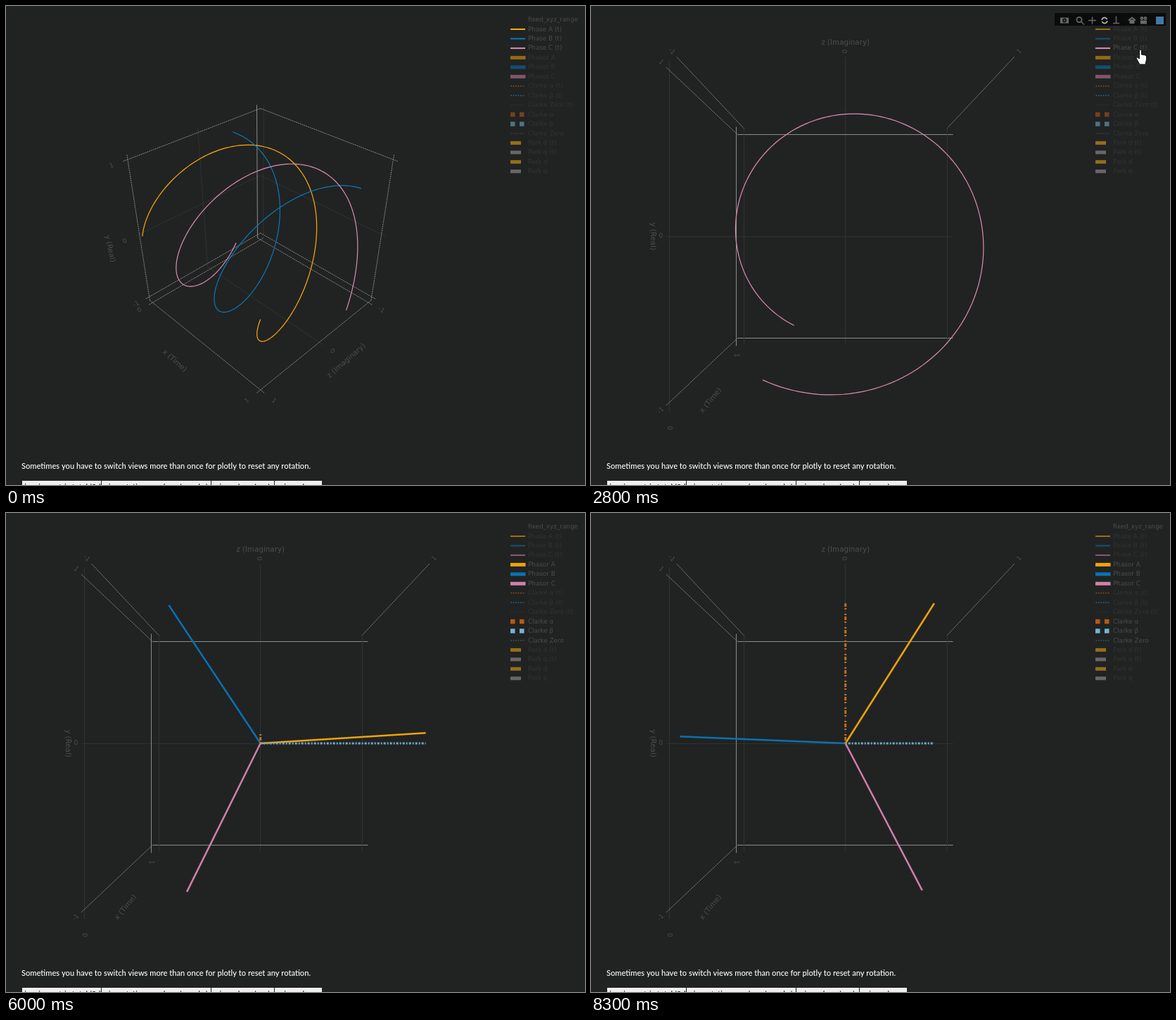
An HTML page with a canvas for the animation above (8400 ms loop, 823 by 680 pixels).

```html
<!DOCTYPE html>
<html lang="en">
<head>
<meta charset="utf-8">
<title>Phasor plot</title>
<style>
html, body { margin: 0; width: 100%; height: 100%; overflow: hidden; background: #212322; }
canvas { display: block; }
</style>
</head>
<body>
<canvas id="stage" width="823" height="680"></canvas>
<script>
const ctx = document.getElementById('stage').getContext('2d');
const LOOP = 8400, CENTER = { x: 361.7, y: 327 }, FOCAL = 770;
const BOX = 0.517, UNIT = 0.487;  // half size of the box, length of one data unit
const SANS = '"DejaVu Sans", sans-serif';
const EDGE = '#8a8b8a', GRID = '#303231', ICON = '#686a69';

// Each view: wall positions, the axis along which labels are pushed out, and a camera.
const iso = {
  walls: { x: -BOX, y: -BOX, z: -BOX }, push: { x: 'z', y: 'z', z: 'x' }, distance: 3.16,
  camera: ({ x, y, z }) => [(x - z) / Math.SQRT2, (2 * y - x - z) / Math.sqrt(6),
    3.16 - (x + y + z) / Math.sqrt(3)]
};
const front = {
  walls: { x: BOX, y: BOX, z: -BOX }, push: { x: 'y', y: 'x', z: 'x' }, distance: 2.08,
  camera: ({ x, y, z }) => [z, y, 2.08 + x]
};
const titles = { x: 'x (Time)', y: 'y (Real)', z: 'z (Imaginary)' };

const legend = [
  ['Phase A (t)', '#ffa90e', 'line'], ['Phase B (t)', '#0a78bd', 'line'],
  ['Phase C (t)', '#de8bb6', 'line'], ['Phasor A', '#f0a30a', 'bar'],
  ['Phasor B', '#0872b4', 'bar'], ['Phasor C', '#d080ac', 'bar'],
  ['Clarke α (t)', '#d5701a', 'dots'], ['Clarke β (t)', '#2a8fd6', 'dots'],
  ['Clarke Zero (t)', '#26403b', 'dots'], ['Clarke α', '#b65a16', 'squares'],
  ['Clarke β', '#72b4d4', 'squares'], ['Clarke Zero', '#2f5a50', 'dots'],
  ['Park d (t)', '#f5a919', 'short'], ['Park q (t)', '#a19da3', 'short'],
  ['Park d', '#f5a919', 'short'], ['Park q', '#a19da3', 'short']
];
const rowY = i => 33 + 13.45 * i;

// Legend rows are clicked one after another; the phases start out visible.
const clickOrder = [0, 1, 2, 3, 4, 5, 9, 10, 11];
const clickTime = n => 2500 + 260 * n;
function shown(row, t) {
  const n = clickOrder.indexOf(row);
  return n >= 0 && (t >= clickTime(n)) !== (row < 3);
}

const rotation = [[5900, 0], [6300, 3], [6600, 3], [6700, 4], [8300, 16]];

function interpolate(keys, t) {
  const next = keys.findIndex(([time]) => time > t);
  if (next < 0) return keys[keys.length - 1][1];
  if (next === 0) return keys[0][1];
  const [[t0, a], [t1, b]] = [keys[next - 1], keys[next]];
  return a + (b - a) * (t - t0) / (t1 - t0);
}

function line(points, color, width = 1, dash = []) {
  ctx.beginPath();
  points.forEach(([x, y]) => ctx.lineTo(x, y));
  ctx.strokeStyle = color;
  ctx.lineWidth = width;
  ctx.setLineDash(dash);
  ctx.stroke();
  ctx.setLineDash([]);
}

function project(view, point) {
  const [x, y, depth] = view.camera(point);
  return [CENTER.x + FOCAL * x / depth, CENTER.y - FOCAL * y / depth];
}

function label(text, size, [x, y], [x0, y0], [x1, y1]) {
  ctx.save();
  ctx.translate(x, y);
  ctx.rotate(Math.atan((y1 - y0) / (x1 - x0)));
  ctx.font = size + 'px ' + SANS;
  ctx.textAlign = 'center';
  ctx.textBaseline = 'middle';
  ctx.fillStyle = '#4c4e4d';
  ctx.fillText(text, 0, 0);
  ctx.restore();
}

function drawGridLine(view, axis, wall, value) {
  if (view === front && axis + wall === 'xy') return;
  const along = [...'xyz'].find(k => k !== axis && k !== wall);
  const ends = [-BOX, BOX].map(end =>
    project(view, { [axis]: value * UNIT, [wall]: view.walls[wall], [along]: end }));
  const dim = value === 0 || axis + wall + value === 'xz-1' ||
    (view === front && axis + wall === 'zx');
  const [dx, dy] = [0, 1].map(k => Math.abs(ends[0][k] - ends[1][k]));
  const straight = Math.min(dx, dy) < 1;
  const snapped = straight ? ends.map(p => p.map(v => Math.floor(v) + 0.5)) : ends;
  line(snapped, dim ? GRID : EDGE, 1, dim || straight ? [] : [2, 1]);
}

function drawAxes(view) {
  const ticks = axis => axis === 'x' ? [-1, 1] : [0, -1, 1];
  for (const dimFirst of [true, false])
    for (const axis of 'xyz')
      for (const wall of 'xyz')
        if (wall !== axis)
          ticks(axis).filter(v => (v === 0) === dimFirst)
            .forEach(v => drawGridLine(view, axis, wall, v));

  for (const axis of 'xyz') {
    const push = view.push[axis];
    const side = -Math.sign(view.walls[push]);
    const place = (value, offset) => project(view, {
      ...view.walls, [axis]: value * UNIT, [push]: side * (BOX + offset * view.distance) });
    for (const v of ticks(axis)) {
      const text = axis === 'x' ? (v + 1) / 2 : v;
      label(text, 9, place(v, 0.022), place(v, 0), place(v, 0.022));
    }
    label(titles[axis], 10.3, place(0, 0.054), place(1, 0.054), place(-1, 0.054));
  }
}

function drawPlot(t) {
  const view = t < 800 ? iso : front;
  drawAxes(view);
  const helix = (time, angle) => project(view, {
    x: UNIT * (2 * time - 1), y: UNIT * Math.sin(angle), z: UNIT * Math.cos(angle) });
  const origin = [CENTER.x, CENTER.y];
  const turn = Math.round(interpolate(rotation, t)) * Math.PI / 50;
  for (let i = 0; i < 3; i++) {
    const shift = i * 2 * Math.PI / 3;
    if (shown(i, t)) {
      const curve = Array.from({ length: 161 }, (_, k) =>
        helix(k / 160, k / 80 * Math.PI + shift));
      line(curve, legend[i][1], 1.2);
    }
    if (shown(i + 3, t)) line([origin, helix(0, turn + shift)], legend[i + 3][1], 2.5);
  }
  const [tipX, tipY] = helix(0, turn);
  if (shown(9, t)) line([origin, [CENTER.x, tipY]], '#c0701a', 3, [2, 2, 5, 2, 2, 6]);
  if (shown(10, t)) line([origin, [tipX, CENTER.y]], '#6fa9cc', 3, [2, 2, 3, 2]);
}

function drawLegend(t) {
  ctx.font = '8.8px ' + SANS;
  ctx.textAlign = 'left';
  ctx.textBaseline = 'middle';
  ctx.fillStyle = '#4a4c4b';
  ctx.fillText('fixed_xyz_range', 742, 19.5);
  legend.forEach(([name, color, kind], i) => {
    const y = rowY(i), active = shown(i, t);
    ctx.globalAlpha = active ? 1 : 0.55;
    ctx.fillStyle = color;
    if (kind === 'line') line([[717, y], [738, y]], color, 2);
    if (kind === 'dots') line([[717.5, y], [737, y]], color, 1.7, [1.7, 1.7]);
    if (kind === 'bar') ctx.fillRect(717, y - 2.5, 21.5, 5);
    if (kind === 'short') ctx.fillRect(717, y - 2.5, 15, 5);
    if (kind === 'squares') [717, 730].forEach(x => ctx.fillRect(x, y - 3.2, 6.5, 6.4));
    ctx.globalAlpha = active ? 1 : 0.4;
    ctx.fillStyle = '#4a4c4b';
    ctx.fillText(name, 742, y + 0.3);
    ctx.globalAlpha = 1;
  });
}

function ring(x, y, r, color = ICON, from = 0, to = 2 * Math.PI) {
  ctx.beginPath();
  ctx.arc(x, y, r, from, to);
  ctx.strokeStyle = color;
  ctx.lineWidth = 1.8;
  ctx.stroke();
}

function drawModebar() {
  const y = 20.5;
  ctx.fillStyle = 'rgba(8,9,9,.88)';
  ctx.fillRect(659, 10, 158, 18);
  ctx.fillStyle = ICON;
  ctx.fillRect(667, y - 4, 12, 8);                          // camera
  ring(673, y, 2, '#111');
  ring(694, y - 1, 3.6);                                    // zoom
  line([[697, y + 2], [701, y + 6]], ICON, 1.5);
  line([[707, y], [718, y]], ICON, 1.5);                    // pan
  line([[712.5, y - 5], [712.5, y + 5]], ICON, 1.5);
  [0, Math.PI].forEach(a => ring(730, y, 4, '#b9bbba', a + 0.2, a + 2.7));  // orbit
  line([[746.5, y - 6], [746.5, y + 4]], ICON, 1.5);        // turntable
  line([[742, y + 4], [751, y + 4]], ICON, 1.5);
  line([[764, y], [769, y - 4], [774, y]], ICON, 2);        // home
  ctx.fillRect(765.5, y - 1, 7, 5.5);
  ctx.fillRect(781, y, 9, 5);                               // last view
  [783, 788].forEach(x => ring(x, y - 3, 1.5));
  ctx.fillStyle = '#4479a6';
  ctx.fillRect(803, 15, 11, 11);
}

const arrow = new Path2D('M0 0V16L4 12.5L6.5 18.5L9 17.5L6.5 11.5H11.5Z');
const hand = new Path2D('M-1.5 1Q0-1 1.5 1V7Q6 7 8.5 9V14L7 21H-1L-6 12Q-5 10-1.5 13Z');

function pointerAt(t) {
  if (t >= 300 && t < 600) {
    const p = (t - 300) / 200;
    return [600 - 306 * p, 250 + 387 * p];
  }
  const lastClick = clickTime(clickOrder.length - 1);
  if (t < 2000 || t >= 5100) return null;
  const target = clickOrder.find((_, n) => t < clickTime(n)) ?? 11;
  const x = 781 - (t - 2800) * 0.0053, y = rowY(target) + 2;
  return [
    interpolate([[2000, 560], [2400, x], [lastClick, x], [5000, 690]], t),
    interpolate([[2000, 590], [2400, y], [lastClick, y], [5000, 541]], t)
  ];
}

function drawPointer(t) {
  const position = pointerAt(t);
  if (!position) return;
  drawModebar();
  const shape = t < 600 ? arrow : hand;
  ctx.save();
  ctx.translate(...position);
  ctx.fillStyle = '#fff';
  ctx.strokeStyle = '#111';
  ctx.lineWidth = 1;
  ctx.fill(shape);
  ctx.stroke(shape);
  ctx.restore();
}

function drawFooter() {
  ctx.textAlign = 'left';
  ctx.textBaseline = 'alphabetic';
  ctx.font = '500 11.12px Lato, sans-serif';
  ctx.fillStyle = '#fff';
  ctx.fillText('Sometimes you have to switch views more than once for plotly to reset any rotation.', 22, 657.3);
  ctx.font = '11.1px Lato, sans-serif';
  let x = 23;
  for (const [text, width] of [['view isometric total (3d)', 112],
    ['view stationary plane (y and z)', 155], ['view plane (x, y)', 89], ['view plane', 67]]) {
    ctx.fillStyle = '#efefef';
    ctx.fillRect(x, 674, width, 6);
    ctx.fillStyle = '#111';
    ctx.fillText(text, x + (width - ctx.measureText(text).width) / 2, 687.3);
    x += width + 1;
  }
}

function frame() {
  const t = Math.floor(performance.now() % LOOP / 100) * 100;
  ctx.fillStyle = '#212322';
  ctx.fillRect(0, 0, 823, 680);
  drawPlot(t);
  drawLegend(t);
  drawFooter();
  drawPointer(t);
  requestAnimationFrame(frame);
}
frame();
</script>
</body>
</html>
```
